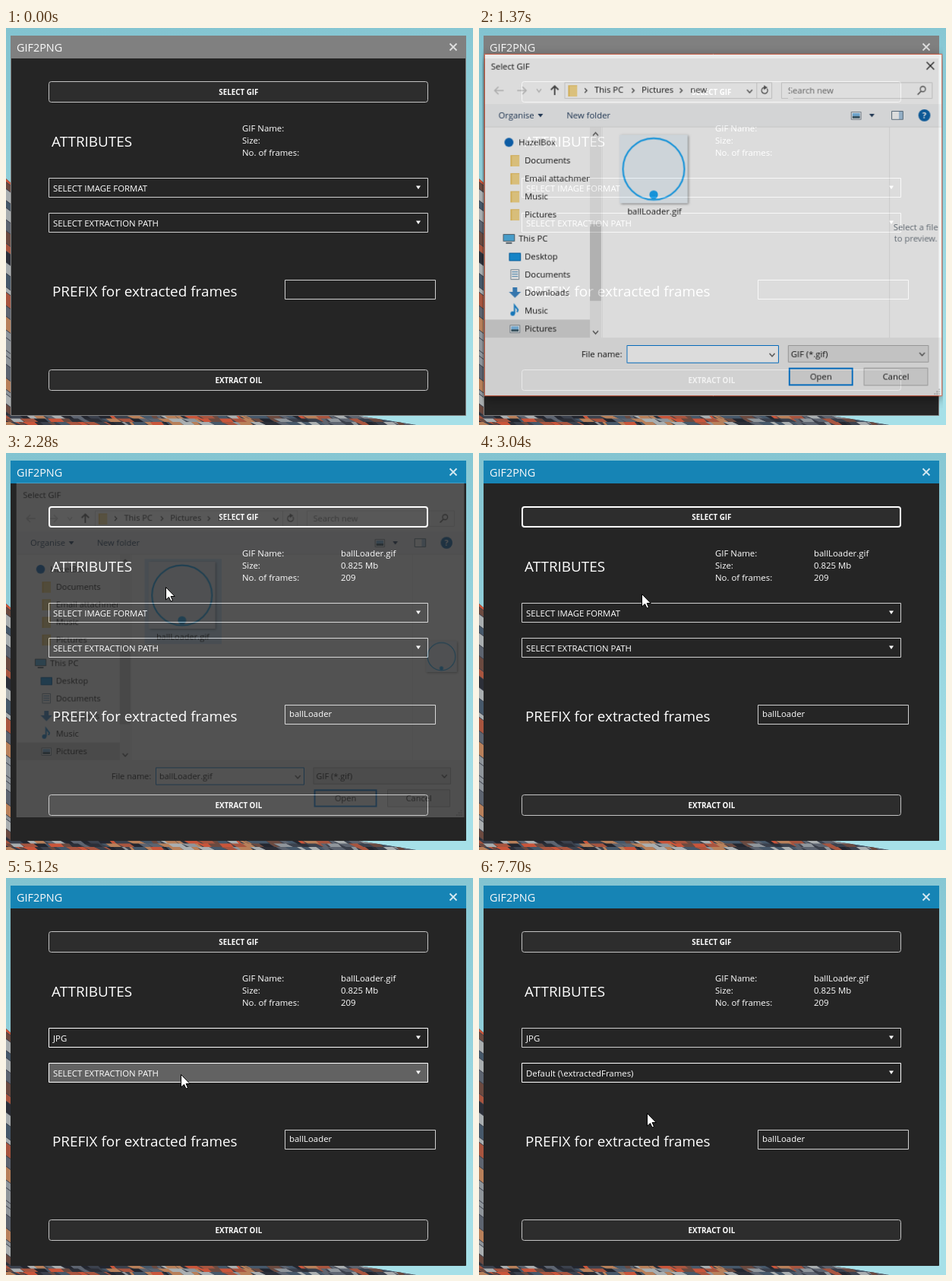
Write an HTML page with a canvas that moves like this. It is 615 px wide and 522 px high and loops after 8000 ms.

```html
<!DOCTYPE html>
<html lang="en">
<head>
<meta charset="utf-8">
<title>GIF2PNG</title>
<style>
html, body { margin: 0; width: 100%; height: 100%; overflow: hidden; background: #252525 }
canvas { display: block }
</style>
</head>
<body>
<canvas id="stage" width="615" height="522"></canvas>
<script>
const W = 615, H = 522, LOOP = 8000;
const stage = document.getElementById('stage').getContext('2d', { alpha: false });
let g = stage;

const clamp = v => Math.max(0, Math.min(1, v));
const ramp = (t, a, b) => clamp((t - a) / (b - a));
const between = (t, a, b) => t >= a && t < b;

function layer() {
  const c = document.createElement('canvas');
  c.width = W; c.height = H;
  return c.getContext('2d');
}

// Drawing helpers; text is placed by the middle of its capitals
function text(s, x, y, color = '#fff', size = 11.4, align = 'left', weight = color === '#fff' ? 500 : 400) {
  g.font = `${weight} ${size}px "Open Sans", "Noto Sans", sans-serif`;
  g.textAlign = align;
  g.fillStyle = color;
  g.fillText(s, x, Math.round(y + size * .357));
}
function box(x, y, w, h, fill, stroke, line = 1, radius = 0) {
  const o = stroke ? line / 2 : 0;
  g.beginPath();
  g.roundRect(x + o, y + o, w - 2 * o, h - 2 * o, radius);
  if (fill) { g.fillStyle = fill; g.fill(); }
  if (stroke) { g.strokeStyle = stroke; g.lineWidth = line; g.stroke(); }
}
function poly(points, fill) {
  g.beginPath();
  points.forEach(([x, y]) => g.lineTo(x, y));
  g.closePath();
  g.fillStyle = fill;
  g.fill();
}
function lines(color, width, ...paths) {
  g.strokeStyle = color;
  g.lineWidth = width;
  g.beginPath();
  for (const p of paths) p.forEach(([x, y], i) => i ? g.lineTo(x, y) : g.moveTo(x, y));
  g.stroke();
}
function disc(x, y, r, fill, stroke, width = 1) {
  g.beginPath();
  g.arc(x, y, r, 0, 7);
  if (fill) { g.fillStyle = fill; g.fill(); }
  if (stroke) { g.strokeStyle = stroke; g.lineWidth = width; g.stroke(); }
}
const triangle = (x, y, color, r = 3.5) => poly([[x - r, y - 2], [x + r, y - 2], [x, y + 2.5]], color);
const chevron = (x, y, dir, color = '#555', r = 3.5) =>
  lines(color, 1.4, [[x - r, y - dir * 2], [x, y + dir * 2], [x + r, y - dir * 2]]);

// Desktop: sky and a coloured facade, only seen around the window
const desktop = layer();
function drawDesktop() {
  g = desktop;
  let seed = 7;
  const rnd = () => (seed = seed * 16807 % 2147483647) / 2147483647;
  const sky = g.createLinearGradient(0, 0, 60, H);
  sky.addColorStop(0, '#82c3d0');
  sky.addColorStop(1, '#a6e0e8');
  box(0, 0, W, H, sky);
  const paint = ['#2c2f38', '#3b414d', '#6b4a40', '#8f959b', '#23262f', '#a9aeb0', '#5d6470', '#a8553f', '#46586a', '#b8805a', '#c9553a'];
  const pick = () => paint[Math.floor(rnd() * paint.length)];
  g.save();
  g.beginPath();
  [[0, 198], [8, 205], [8, 500], [440, 506], [540, H], [0, H]].forEach(p => g.lineTo(...p));
  g.clip();
  box(0, 198, W, H, '#3a3f4a');
  for (let y = 198; y < H; ) {
    const h = 5 + rnd() * 14;
    poly([[0, y], [8, y + 6], [8, y + h + 5], [0, y + h - 1]], pick());
    y += h;
  }
  for (let row = 0; row < 3; row++)
    for (let x = -8; x < 560; ) {
      const w = 3 + rnd() * 15, y = 509 + row * 4.5, lean = 4 + rnd() * 8;
      poly([[x, y], [x + w, y], [x + w + lean, y + 5], [x + lean, y + 5]], pick());
      x += w;
    }
  g.restore();
}
drawDesktop();

// Pointer track: time, x, y
const track = [
  [0, 444, 535], [50, 444, 524], [330, 430, 345], [610, 410, 85], [1450, 410, 85], [1760, 210, 176],
  [2990, 210, 177], [3240, 232, 216], [3399, 232, 216], [3400, 233, 216], [3980, 233, 216], [4260, 231, 272],
  [4700, 231, 272], [4830, 230, 258], [6080, 230, 258], [6360, 229, 314], [6540, 226, 356], [6700, 225, 357],
  [6890, 222, 342], [7000, 221, 309], [8000, 221, 309]
];
function pointerAt(t) {
  const i = Math.max(1, track.findIndex(k => k[0] > t));
  const [a, b] = [track[i - 1], track[i]], k = ramp(t, a[0], b[0]);
  return { x: Math.round(a[1] + (b[1] - a[1]) * k), y: Math.round(a[2] + (b[2] - a[2]) * k) };
}
const inside = (p, x, y, w, h) => p.x >= x && p.x < x + w && p.y >= y && p.y < y + h;

function drawPointer({ x, y }, beam) {
  if (beam) {
    lines('#ddd', 1, [[x - 3, y - 7.5], [x + 4, y - 7.5]], [[x + .5, y - 7], [x + .5, y + 7]], [[x - 3, y + 7.5], [x + 4, y + 7.5]]);
    return;
  }
  const shape = [[0, 0], [0, 16.5], [4, 13], [6.6, 18.5], [9, 17.5], [6.6, 12], [11.7, 12]].map(([a, b]) => [x + a + .5, y + b + .5]);
  poly(shape, '#fff');
  lines('#000', 1, [...shape, shape[0]]);
}

// Main window
function button(label, y, hover, focus) {
  box(56, y, 500, 28, hover ? '#5a5a5a' : '#2d2d2d', focus ? '#fff' : '#c4c4c4', focus ? 2 : 1, 3);
  text(label, 306.3, y + 14.5, '#fff', 9.8, 'center', 700);
}
function combo(label, y, lit, focus) {
  box(56, y, 500, 26, lit ? '#626262' : '#252525', focus || lit ? '#fff' : '#d0d0d0');
  text(label, 62, y + 13.5);
  triangle(543, y + 12.5, '#fff', 3);
}
function popup(items, y, open, p) {
  const h = items.length * 22 + 4, shift = Math.round(h * (open - 1));
  g.save();
  g.beginPath();
  g.rect(56, y, 500, h);
  g.clip();
  g.translate(0, shift);
  box(56, y, 500, h, '#252525', '#a0a098');
  items.forEach((item, i) => {
    const top = y + 2 + i * 22;
    const hover = inside(p, 58, top, 496, 22);
    if (!i || hover) box(58, top, 496, 22, i ? '#1e5169' : '#196e93');
    text(item, 60, top + 11.5);
  });
  g.restore();
}
function drawWindow(t, p) {
  const active = between(t, 790, 970) || t >= 2170, loaded = t >= 2170;
  const blocked = between(t, 970, 2170);
  box(6, 10, 600, 500, '#252525', active ? '#252525' : '#808080');
  box(6, 10, 600, 30, active ? '#1684b5' : '#808080');
  text('GIF2PNG', 14, 25.5, '#fafafa', 14.4);
  lines(active ? '#d4e8f1' : '#dedede', 1.8, [[584.5, 20.5], [593.5, 29.5]], [[593.5, 20.5], [584.5, 29.5]]);

  button('SELECT GIF', 70, !blocked && inside(p, 56, 70, 500, 28), between(t, 790, 970) || between(t, 2170, 3680));
  text('ATTRIBUTES', 60, 149, '#fff', 18.9, 'left', 400);
  const facts = [['GIF Name:', 'ballLoader.gif'], ['Size:', '0.825 Mb'], ['No. of frames:', '209']];
  facts.forEach(([name, value], i) => {
    text(name, 311, 132 + i * 16);
    if (loaded) text(value, 441, 132 + i * 16);
  });

  const open1 = between(t, 3680, 5100), open2 = between(t, 5730, 7700);
  const over = y => !blocked && inside(p, 56, y, 500, 26);
  const format = t < 5100 ? 'SELECT IMAGE FORMAT' : 'JPG';
  const path = t < 7700 ? 'SELECT EXTRACTION PATH' : 'Default (\\extractedFrames)';
  combo(format, 197, open1 || over(197), between(t, 3680, 5730));
  combo(path, 243, open2 || over(243) && !open1, t >= 5730);

  text('PREFIX for extracted frames', 61, 346, '#fff', 18.9, 'left', 400);
  box(367, 331, 199, 26, '#252525', inside(p, 367, 331, 199, 26) ? '#fff' : '#d0d0d0');
  if (loaded) text('ballLoader', 373, 343.4);
  button('EXTRACT OIL', 449, inside(p, 56, 449, 500, 28));

  if (open1) popup(['SELECT IMAGE FORMAT', 'JPG', 'PNG'], 223, ramp(t, 3650, 3820), p);
  if (open2) popup(['SELECT EXTRACTION PATH', 'Default (\\extractedFrames)', 'Custom', '\\ballLoader'], 269, ramp(t, 5700, 5890), p);
}

// File dialog
const INK = '#111', NAVY = '#1e395b', BLUE = '#0078d7';
function folder(x, y) {
  box(x, y - 7, 12, 15, '#f0c661');
  box(x + 2, y - 6, 10, 14, '#fbdc8b');
}
function picture(x, y) {
  box(x - 7, y - 5, 14, 11, '#fff', '#7b8894');
  box(x - 5, y - 3, 10, 4, '#7dbdeb');
  box(x - 5, y + 1, 10, 3, '#3d5c6b');
}
function loader(x, y, size) {
  const r = size / 2;
  g.save();
  g.shadowColor = 'rgba(0,0,0,.45)';
  g.shadowBlur = 3;
  g.shadowOffsetX = g.shadowOffsetY = 1;
  box(x - r, y - r, size, size, '#eef6fc');
  g.restore();
  disc(x, y, r * .9, null, '#14a8fb', Math.max(1.2, size / 42));
  disc(x, y + r * .75, r * .125, '#14a8fb');
}
const icons = {
  cloud: y => disc(36, y, 6, '#0a68bd'),
  folder: y => folder(38, y),
  pc(y) { box(28, y - 6, 16, 10, '#4fb4e8', '#55646f'); box(32, y + 5, 8, 2, '#55646f'); },
  desktop(y) { box(36, y - 5, 16, 11, '#1597e5', '#0a6ab0'); },
  page(y) { box(38, y - 7, 12, 14, '#fff', '#8496a3'); lines('#4a90c2', 1, ...[-3.5, -.5, 2.5].map(d => [[40, y + d], [48, y + d]])); },
  down(y) { box(41, y - 7, 6, 7, '#3a87c8'); poly([[36, y - 1], [52, y - 1], [44, y + 7]], '#3a87c8'); },
  note(y) { disc(41, y + 4, 3, '#1688d6'); lines('#1688d6', 2, [[43.5, y + 4], [43.5, y - 7], [48, y - 1], [47, y + 2]]); },
  picture: y => picture(44, y)
};
const places = [
  ['HazelBox', 149, 'cloud'], ['Documents', 173, 'folder'], ['Email attachments', 197, 'folder'],
  ['Music', 221, 'folder'], ['Pictures', 245, 'folder'], ['This PC', 277, 'pc'], ['Desktop', 301, 'desktop'],
  ['Documents', 325, 'page'], ['Downloads', 349, 'down'], ['Music', 373, 'note'], ['Pictures', 397, 'picture']
];
const dialog = layer();
function drawDialog(hover, selected, closing) {
  g = dialog;
  g.clearRect(0, 0, W, H);
  g.save();
  g.shadowColor = `rgba(0,0,0,${closing ? 0 : .5})`;
  g.shadowBlur = 14;
  g.shadowOffsetY = 4;
  box(3, 31, 611, 456, '#fff');
  g.restore();
  if (!closing) box(3, 31, 611, 456, null, '#d2492a');
  text('Select GIF', 12, 48, INK);
  if (!closing) lines('#111', 1.2, [[593, 42], [603, 52]], [[603, 42], [593, 52]]);

  // Address row
  const arrow = (x, d) => lines('#c8c8c8', 1.6, [[x - 6, 80], [x + 6, 80]], [[x + d, 75], [x + d * 6, 80], [x + d, 85]]);
  arrow(23, -1);
  arrow(53, 1);
  chevron(76, 80, 1, '#c8c8c8', 3);
  lines('#444', 1.8, [[97, 86], [97, 74]], [[92, 79], [97, 74], [102, 79]]);
  box(110, 69, 277, 22, '#fff', '#d9d9d9');
  folder(115, 80);
  for (const x of [138, 201, 265]) lines('#444', 1.3, [[x - 1, 77], [x + 2, 80], [x - 1, 83]]);
  text('This PC', 150, 79.4, INK);
  text('Pictures', 213, 79.4, INK);
  text('new', 278, 79.4, INK);
  chevron(357, 81, 1);
  box(366, 70, 1, 20, '#d9d9d9');
  g.beginPath();
  g.arc(377, 80, 4, -.6, 4.6);
  g.strokeStyle = '#555';
  g.lineWidth = 1.4;
  g.stroke();
  poly([[376, 73], [381, 76], [376, 79]], '#555');
  box(399, 69, 202, 22, '#fff', '#d9d9d9');
  text('Search new', 408, 80, '#6d6d6d');
  disc(588, 78, 3.5, null, '#555', 1.3);
  lines('#555', 1.6, [[585.5, 81], [581, 85.5]]);

  // Toolbar
  box(4, 98, 609, 30, '#f5f6f7');
  text('Organise', 22, 113, NAVY);
  triangle(78, 113, NAVY);
  text('New folder', 113, 113, NAVY);
  picture(499, 113);
  triangle(520, 113, NAVY);
  box(546, 107, 16, 12, '#fff', '#5f7588');
  box(556, 108, 5, 10, '#a9c9e4');
  disc(590, 113, 8, '#0a64ad');
  text('?', 590, 113, '#fff', 11.4, 'center', 700);
  box(4, 128, 609, 1, '#e6e6e6');

  // Places
  g.save();
  g.beginPath();
  g.rect(4, 129, 140, 280);
  g.clip();
  box(4, 385, 140, 24, '#d9d9d9');
  for (const [name, y, icon] of places) {
    text(name, icon === 'cloud' || icon === 'pc' ? 49 : 57, y, INK);
    icons[icon](y);
  }
  g.restore();
  box(144, 129, 15, 280, '#f0f0f0');
  box(144, 258, 15, 102, '#cdcdcd');
  chevron(151.5, 138, -1);
  chevron(151.5, 402, 1);
  box(160, 129, 1, 280, '#f0f0f0');

  // File and preview
  if (hover || selected) box(178, 135, 105, 116, selected ? '#cce8ff' : '#e5f3ff');
  loader(229, 184.5, 91);
  text('ballLoader.gif', 230, 241, INK, 11.4, 'center');
  box(543, 129, 1, 280, '#ececec');
  if (selected) loader(583, 268, 42);
  else {
    text('Select a file', 578.5, 262, '#6c7680', 11.4, 'center');
    text('to preview.', 578.5, 277, '#6c7680', 11.4, 'center');
  }

  // Bottom bar
  box(4, 409, 609, 77, '#f0f0f0');
  text('File name:', 187, 431, INK, 11.4, 'right');
  box(193, 419, 203, 24, '#fff', BLUE);
  if (selected) text('ballLoader.gif', 198, 431, INK);
  chevron(387, 432, 1);
  box(408, 419, 188, 23, '#e1e1e1', '#adadad');
  text('GIF (*.gif)', 412, 431, INK);
  chevron(587, 431, 1);
  box(409, 449, 86, 24, '#e1e1e1', BLUE, 2);
  text('Open', 452, 461, INK, 11.4, 'center');
  box(509, 449, 86, 24, '#e1e1e1', '#adadad');
  text('Cancel', 552, 461, INK, 11.4, 'center');
  for (let i = 0; i < 3; i++)
    for (let j = 0; j <= i; j++) box(609 - j * 3, 477 + i * 3, 2, 2, '#bcbcbc');
  g = stage;
}

function frame() {
  const t = performance.now() % LOOP, p = pointerAt(t);
  g = stage;
  g.drawImage(desktop.canvas, 0, 0);
  drawWindow(t, p);
  if (between(t, 1250, 2310)) {
    const enter = 1 - (1 - ramp(t, 1250, 1450)) ** 2, leave = ramp(t, 2170, 2310);
    const scale = (.92 + .08 * enter) * (1 - .044 * leave);
    drawDialog(inside(p, 178, 135, 105, 116), t >= 2040, leave > 0);
    g.save();
    g.globalAlpha = enter * (1 - leave);
    g.translate(309, 258);
    g.scale(scale, scale);
    g.drawImage(dialog.canvas, -309, -258);
    g.restore();
  }
  drawPointer(p, between(t, 970, 1480) || t < 970 && inside(p, 367, 331, 199, 26));
  requestAnimationFrame(frame);
}
frame();
</script>
</body>
</html>
```
